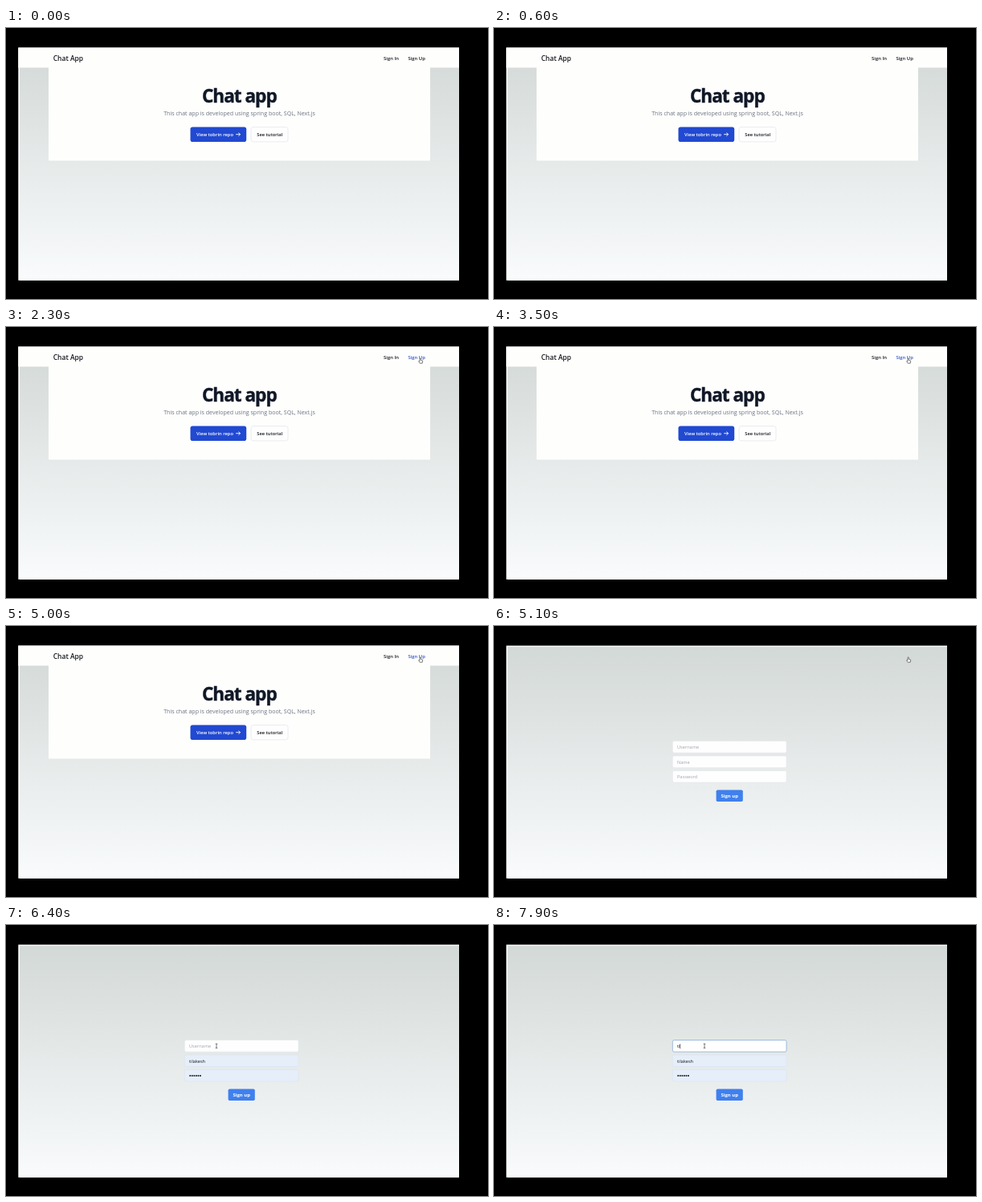
Recreate the animation shown at these times as an HTML page. Size 600 by 338 pixels, loop 8 s.

```html
<!DOCTYPE html>
<html lang="en">
<head>
<meta charset="utf-8">
<title>Chat App</title>
<style>
  html, body { margin: 0; width: 100%; height: 100%; overflow: hidden; background: #000; }
  svg { display: block; width: 600px; height: 338px; }
  text { font-family: "Open Sans", "Noto Sans", sans-serif; fill: #16181d; white-space: pre; }
  .semi { font-weight: 600; }
  .nav { font-size: 5.9px; }
  .btn { font-size: 5.75px; }
  .field { font-size: 5.6px; }
  .hint { fill: #a0a5ae; }
  .box { fill: #fefefe; stroke: #e3e6e8; stroke-width: .6; }
  .filled .box { fill: #e6eefa; stroke: #d9e2ee; }
  .focused { stroke: #94b3dc; stroke-width: .9; }
  .white { fill: #fff; }
</style>
</head>
<body>
<svg viewBox="0 0 600 338">
  <defs>
    <linearGradient id="sky" x2="0" y2="1">
      <stop stop-color="#d3d9d7"/>
      <stop offset="1" stop-color="#f9fbfc"/>
    </linearGradient>
  </defs>
  <rect width="600" height="338"/>
  <rect x="15.3" y="24.5" width="548.7" height="290.3" fill="#fbfcfb"/>
  <rect x="17" y="26" width="547" height="288.8" fill="url(#sky)"/>

  <g id="home">
    <path d="M15.3 24.5H564V49.5H528V165.5H53V49.5H15.3Z" fill="#fefefd"/>
    <text class="semi" x="58.7" y="41" font-size="8.5">Chat App</text>
    <text class="semi nav" x="470" y="39.8">Sign In</text>
    <text class="semi nav" x="500.4" y="39.8" id="signUp">Sign Up</text>
    <text x="290.3" y="93.3" font-size="22.6" font-weight="700" letter-spacing="-1" text-anchor="middle"
      style="fill:#111827;stroke:#111827;stroke-width:.4">Chat app</text>
    <text x="290.5" y="109.3" font-size="7.07" text-anchor="middle" style="fill:#6b7280">This chat app is developed using spring boot, SQL, Next.js</text>
    <rect x="229.5" y="123.5" width="69.7" height="18.5" rx="2.8" fill="#2149d1"/>
    <text class="semi btn white" x="237" y="135">View tobrin repo</text>
    <path d="M286.2 132.7H291.6M289.4 130.6L291.6 132.7L289.4 134.8" fill="none" stroke="#fff" stroke-width=".9"/>
    <rect x="305" y="123.6" width="46" height="18.3" rx="2.8" fill="#fefefe" stroke="#e5e7eb" stroke-width=".8"/>
    <text class="semi btn" x="312.3" y="135">See tutorial</text>
  </g>

  <g id="form">
    <rect class="box" id="userBox" x="222.3" y="143.6" width="141.8" height="14.6" rx="2"/>
    <text class="field" id="user" x="228" y="153.2"></text>
    <path id="caret" stroke="#222" stroke-width=".7"/>
    <g id="fills">
      <rect class="box" x="222.3" y="162.1" width="141.8" height="14.6" rx="2"/>
      <rect class="box" x="222.3" y="180.5" width="141.8" height="14.6" rx="2"/>
      <text class="field" id="name" x="228" y="171.7"></text>
      <text class="field hint" id="pass" x="228" y="190.1">Password</text>
      <path id="dots" d="M229.2 187.9h13" stroke="#16181d" stroke-width="2" stroke-linecap="round" stroke-dasharray="0 2.55"/>
    </g>
    <rect x="276.6" y="204.4" width="33.2" height="14.7" rx="1.8" fill="#3f80ee"/>
    <text class="white" x="293.2" y="213.9" font-size="5.9" font-weight="700" text-anchor="middle">Sign up</text>
  </g>

  <g id="pointer" stroke-linejoin="round">
    <path id="arrow" d="M0 0V5.2L1.2 4.1L2 6L2.8 5.6L2 3.8H3.6Z" fill="#fff" stroke="#333" stroke-width=".6"/>
    <path id="hand" d="M-1 -2.6Q-.4 -3.4 .2 -2.6V-.6L2.1 -.1Q2.8 .2 2.7 1L2.2 3.4H-.8L-2.4 1.1Q-2.3 .2 -1 .9Z" fill="#fff" stroke="#444" stroke-width=".7"/>
    <path id="beam" d="M-1.3 -2.6H1.3M-1.3 2.6H1.3M0 -2.6V2.6" fill="none" stroke="#444" stroke-width=".7"/>
  </g>
</svg>
<script>
const LOOP = 8000, NAME = "tilakesh";
const HOVER = 1850, OPEN = 5100, FILL = 5300, FOCUS = 6900;
const KEYS = [7500, 7800];
// time, x, y
const PATH = [[1200, 526.5, 307.5], [1400, 526.5, 307.5], [1600, 540, 180], [1850, 516, 41.8],
  [5200, 516, 41.8], [5400, 262, 150.8]];

const $ = id => document.getElementById(id);
const show = (id, on) => $(id).style.display = on ? "" : "none";

function pointerAt(t) {
  const i = PATH.findIndex(p => p[0] > t);
  if (i < 0) return PATH.at(-1).slice(1);
  const [a, b] = [PATH[Math.max(i - 1, 0)], PATH[i]];
  const k = a === b ? 0 : (t - a[0]) / (b[0] - a[0]);
  return [a[1] + (b[1] - a[1]) * k, a[2] + (b[2] - a[2]) * k];
}

function draw(t) {
  const open = t >= OPEN, filled = t >= FILL, focused = t >= FOCUS;
  show("home", !open);
  show("form", open);
  $("signUp").style.fill = t >= HOVER ? "#3355cc" : "";

  const typed = NAME.slice(0, KEYS.filter(k => t >= k).length);
  $("user").textContent = typed || "Username";
  $("user").classList.toggle("hint", !typed);
  $("userBox").classList.toggle("focused", focused);
  const x = 228.3 + (typed && open ? $("user").getComputedTextLength() : 0);
  $("caret").setAttribute("d", `M${x} 148.4V154.2`);
  show("caret", focused && (typed || (t - FOCUS) % 1000 < 500));

  $("fills").classList.toggle("filled", filled);
  $("name").textContent = filled ? NAME : "Name";
  $("name").classList.toggle("hint", !filled);
  show("pass", !filled);
  show("dots", filled);

  const hand = t >= HOVER && t < 5200, beam = t >= 5400;
  show("pointer", t >= 1200);
  show("hand", hand);
  show("beam", beam);
  show("arrow", !hand && !beam);
  $("pointer").setAttribute("transform", `translate(${pointerAt(t)})`);
}

const start = performance.now();
function tick() {
  draw((performance.now() - start) % LOOP);
  requestAnimationFrame(tick);
}
tick();
</script>
</body>
</html>
```
